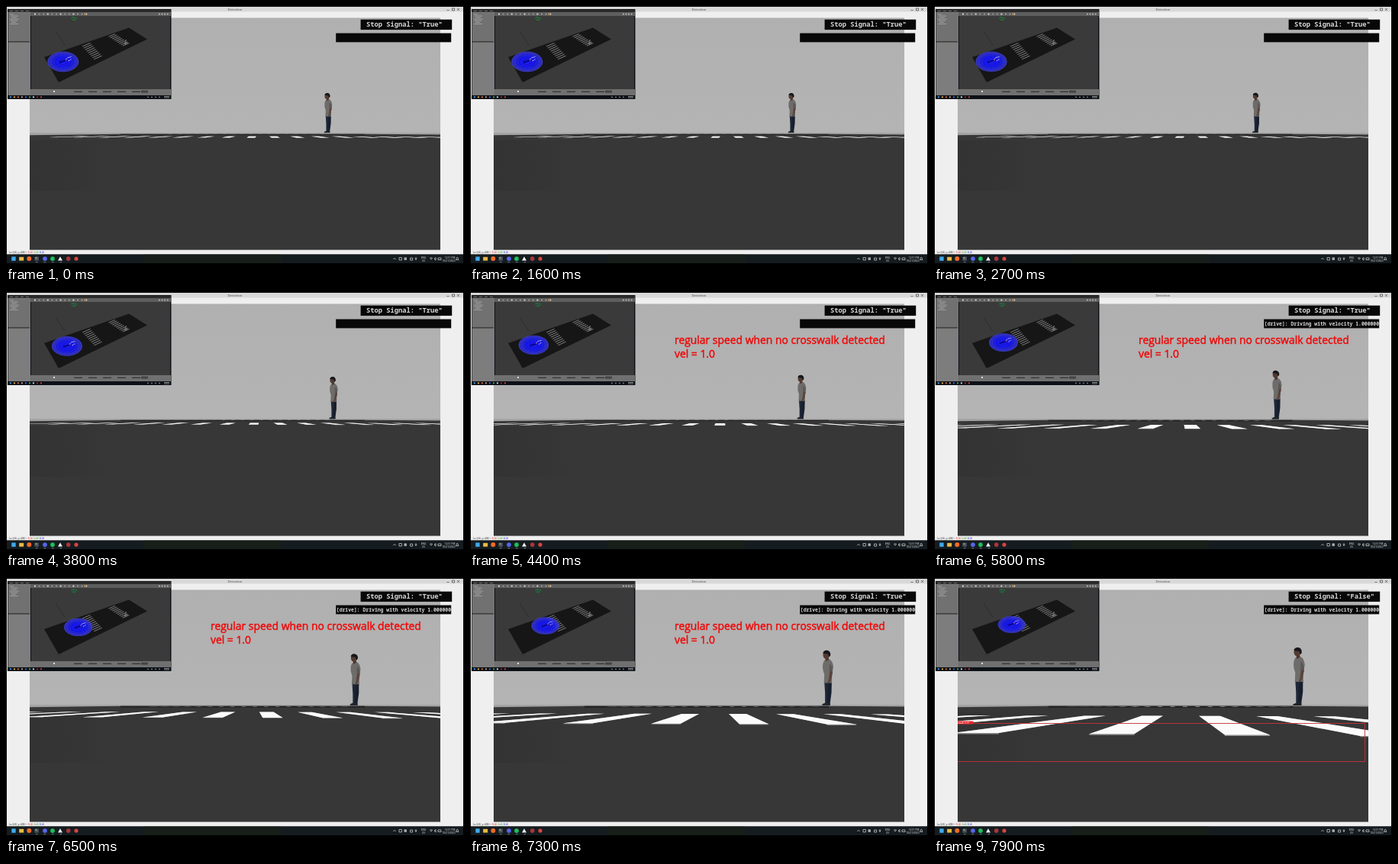
Animation of 600 by 338 pixels, one loop 8000 ms. Source, as an HTML page:

```html
<!DOCTYPE html>
<html lang="en">
<head>
<meta charset="utf-8">
<title>Crosswalk drive</title>
<style>
html, body { margin: 0; width: 100%; height: 100%; overflow: hidden; background: #000; }
svg { display: block; width: 100%; height: 100%; }
text { white-space: pre; }
.mono { font-family: "Noto Sans Mono", "DejaVu Sans Mono", monospace; fill: #d8d8d8; }
.tiny { font-family: "Open Sans", sans-serif; font-size: 3.2px; }
.title { font: 4.2px "Open Sans", sans-serif; fill: #444; }
.note { font: 13.9px "Open Sans", sans-serif; fill: #f00808; stroke: #f00808; stroke-width: .45; }
</style>
</head>
<body>
<svg viewBox="0 0 600 338">
  <defs>
    <clipPath id="camClip"><rect x="31" y="15.5" width="538" height="304"/></clipPath>
    <clipPath id="simClip"><rect x="33" y="13" width="182" height="96"/></clipPath>
    <linearGradient id="sky" x2="0" y2="1">
      <stop stop-color="#b0b0b0"/><stop offset="1" stop-color="#b4b4b4"/>
    </linearGradient>
    <linearGradient id="shade">
      <stop stop-color="#303030"/><stop offset="1" stop-color="#303030" stop-opacity="0"/>
    </linearGradient>
    <radialGradient id="scan">
      <stop stop-color="#0a0ae6"/><stop offset=".55" stop-color="#1212ec" stop-opacity=".95"/><stop offset="1" stop-color="#3a3ad8" stop-opacity=".78"/>
    </radialGradient>
  </defs>

  <!-- detection window -->
  <rect x="1" y="1" width="598" height="324.5" fill="#efefef"/>
  <rect x="1" y="1" width="598" height="6.5" fill="#d9d9d9"/>
  <text class="title" x="300" y="6" text-anchor="middle">Detection</text>
  <g fill="none" stroke="#444" stroke-width=".7">
    <path d="M577.5 5.5h3M584.5 3h3v3h-3zM591 3l3 3m0-3l-3 3"/>
  </g>
  <g clip-path="url(#camClip)">
    <rect x="31" y="15" width="538" height="155" fill="url(#sky)"/>
    <rect x="31" y="166.2" width="538" height="4" fill="#a2a2a2"/>
    <path d="M31 169.3L150 167.7H470L569 168.6V320H31z" fill="#373737"/>
    <rect x="31" y="176" width="115" height="66" fill="url(#shade)" opacity=".6"/>
    <path id="band" fill="#1f1f1f"/>
    <path id="farBars" fill="#a8a8a8"/>
    <path id="edges" fill="#8f8f8f"/>
    <path id="bars" fill="#fbfbfb"/>
    <g id="person">
      <path d="M-4-33L6-33 6-18 4-3 4 0-6 0-6-1.6-3-3-3-17z" fill="#1f2737"/>
      <path d="M1-30L6-32 5-16 3-3 0-3z" fill="#171e2c"/>
      <path d="M-7 0v-1.6l4-1.6h7V0z" fill="#20242b"/>
      <path d="M-3-63L3-64Q8-61 8.5-53L6.5-44 6.5-31-4.5-31-4-43Q-7-50-6-57 -5-62-3-63z" fill="#6e6c6a"/>
      <path d="M3-58Q8-54 7.5-46L5-34 2-31 1-33 3-45z" fill="#5a5756"/>
      <path d="M4-47l3.5 1-2.5 12-3 4-1.5-2 2-3z" fill="#5c4238"/>
      <path d="M-3-67h5v4l-4 2z" fill="#4c352d"/>
      <ellipse cx="-1.5" cy="-69.8" rx="4.3" ry="5.5" fill="#543b31"/>
      <path d="M-6-72Q-5-76.5 0-76 5-75 4.5-69L2.5-66.5 1-71z" fill="#17171b"/>
    </g>
    <g id="detection" fill="none">
      <rect id="box" x="10" width="554.5" height="50" stroke="#c0363a" stroke-width=".9"/>
      <rect id="tag" x="31" width="20.5" height="4" fill="#e6282c"/>
      <text id="tagText" class="tiny" x="31" fill="#fff">swalk 0.91</text>
    </g>
  </g>
  <text class="tiny" x="4" y="323.6" fill="#333">(x=228, y=408) ~ <tspan fill="#d33">R:46 </tspan><tspan fill="#292">G:46 </tspan><tspan fill="#33d">B:46</tspan></text>

  <!-- simulator window -->
  <rect x="2" y="4" width="214.5" height="118" fill="#0d1117"/>
  <rect x="2.5" y="4.6" width="213.5" height="3.4" fill="#2b2b2b"/>
  <rect x="2.5" y="8" width="29.5" height="109" fill="#7d7d7d"/>
  <rect x="3" y="9" width="28.5" height="37" fill="#717171"/>
  <rect x="3" y="46" width="28" height="1.6" fill="#3f3f3f"/>
  <rect x="32" y="8" width="184" height="5" fill="#5e5e5e"/>
  <rect x="32" y="109" width="184" height="8" fill="#707070"/>
  <g id="simChrome"></g>
  <g clip-path="url(#simClip)">
    <rect x="33" y="13" width="182" height="96" fill="#3a3a3a"/>
    <path d="M65 33L77 51" stroke="#29292d" stroke-width=".8"/>
    <path d="M50 67L161 28.5 185 43.5 69 100z" fill="#161616"/>
    <path id="stripes" stroke="#8c8c8c" stroke-width=".9" fill="none"/>
    <path d="M157.5 44l-2 6 4-2" stroke="#888" stroke-width=".9" fill="none"/>
    <path d="M85 16l3-1.5 5 1.5-3 3-4-1m2-3l2 4" stroke="#17863a" stroke-width=".8" fill="none"/>
    <g id="lidar">
      <ellipse rx="20.5" ry="13.2" fill="url(#scan)"/>
      <g id="rings" fill="none" stroke="#5a5aee" stroke-width=".35" opacity=".7"></g>
      <path d="M-5 1L4-2" stroke="#05058a" stroke-width="2"/>
      <path d="M3-2.5l3-2.8 5-1.2M7-1l4-2.5" stroke="#e7e7ff" stroke-width="1" stroke-dasharray="1.4 .8" fill="none"/>
      <circle cx="4" cy="-2" r=".8" fill="#9c405f"/>
    </g>
  </g>

  <!-- readouts -->
  <rect x="464.6" y="17.7" width="119.6" height="13.4" fill="#080808"/>
  <text id="signal" class="mono" x="472" y="27.2" font-size="8.75" font-weight="600"></text>
  <rect x="432.2" y="35.6" width="151" height="11.8" fill="#080808"/>
  <text id="log" class="mono" x="432.8" y="43.6" font-size="6.43" font-weight="600">[drive]: Driving with velocity 1.000000</text>
  <g id="note" class="note">
    <text x="268" y="68">regular speed when no crosswalk detected</text>
    <text x="268" y="86">vel = 1.0</text>
  </g>

  <!-- taskbar -->
  <rect x="1" y="325.5" width="598" height="11.5" fill="#151c20"/>
  <rect x="180" y="325.5" width="180" height="11.5" fill="#1b2117" opacity=".6"/>
  <g id="icons"></g>
  <g fill="none" stroke="#ddd" stroke-width=".7">
    <path d="M507.3 332l1.7-1.7 1.7 1.7M515 329.5h3.4v3.4h-3.4zM529.6 330h3v3h-3zM537 329v4m-1.2-2.5q1.2 3 2.4 0"/>
    <path d="M555 330.5q2-1.7 4 0M556 331.8q1-.8 2 0M561.5 330.5v1.5l1.5 1v-3.5zM566 330h4v2.5h-4zM589.5 332.5h3.4l-.6-1v-1.5q-1.1-1.5-2.2 0v1.5z"/>
  </g>
  <rect x="521.5" y="329.4" width="3.4" height="3.4" fill="#a9b0b5"/>
  <g class="tiny" fill="#eee" text-anchor="middle">
    <text x="547" y="330.6">ENG</text><text x="547" y="334.6">US</text>
    <text x="581.5" y="330.6">12:51 PM</text><text x="580" y="334.6">10/21/2023</text>
  </g>
</svg>
<script>
const LOOP = 8000, STEP = 100;
const HORIZON = 165, VANISH = 301;
const $ = id => document.getElementById(id);
const set = (id, attrs) => { for (const k in attrs) $(id).setAttribute(k, attrs[k]); };
const show = (id, on) => set(id, { visibility: on ? "visible" : "hidden" });
const rect = (x, y, w, h, fill) => `<rect x="${x}" y="${y}" width="${w}" height="${h}" fill="${fill}"/>`;
const dot = (x, y, r, fill) => `<circle cx="${x}" cy="${y}" r="${r}" fill="${fill}"/>`;
const range = (a, b) => Array.from({ length: b - a + 1 }, (_, i) => a + i);

function buildStatic() {
  $("stripes").setAttribute("d", range(0, 8).map(i =>
    `M${100 + i * 1.9} ${53 + i * 2.1}l10.5-4.6M${134.5 + i * 2.3} ${40.2 + i * 1.5}l8.5-3.7`).join(""));

  let rings = range(1, 5).map(i => `<ellipse rx="${i * 4}" ry="${i * 2.6}"/>`).join("");
  rings += range(0, 17).map(i => {
    const a = i * Math.PI / 9;
    return `<path d="M0 0L${20 * Math.cos(a)} ${13 * Math.sin(a)}" opacity=".45"/>`;
  }).join("");
  $("rings").innerHTML = rings;

  let chrome = range(0, 6).map(i =>
    rect(5 + (i % 3), 10.5 + i * 2.1, 5 + (i * 5) % 8, .8, "#a8a8a8")).join("");
  chrome += range(0, 12).map(i => rect(37 + i * 5.6, 9.7, 2, 1.8, i % 3 ? "#999" : "#ddd")).join("");
  chrome += range(0, 3).map(i => rect(200 + i * 3.6, 9.7, 1.8, 1.8, "#bbb")).join("");
  chrome += rect(102, 9.5, 3, 2, "#b98845");
  chrome += range(0, 4).map(i => rect(89 + i * 19, 111.7, 11, 1.2, "#303030")).join("");
  chrome += rect(62, 111, 2, 2, "#ddd") + rect(177, 110.6, 9, 3, "#444");
  chrome += range(0, 3).map(i => rect(5 + i * 7, 6, 4, .7, "#888")).join("");
  ["#42a5e8", "#dfb74a", "#e8712d", "#aaa", "#5865e0", "#28b957", "#ddd", "#8b3335", "#d54444"]
    .forEach((c, i) => chrome += dot(6 + i * 5, 119.3, 1.1, c));
  chrome += range(0, 3).map(i => rect(185 + i * 5, 118.8, 2, 1, "#999")).join("");
  chrome += rect(207, 118, 7, .7, "#bbb") + rect(207, 119.7, 7, .7, "#aaa");
  $("simChrome").innerHTML = chrome;

  $("icons").innerHTML = rect(7.3, 328.4, 5.4, 5.4, "#3fa9ee")
    + rect(17.2, 328.8, 6, 4.8, "#e8bb45")
    + dot(30.3, 331.1, 3, "#ee6b2c")
    + rect(37.5, 328.5, 5.4, 5.2, "#4d5357") + rect(38.4, 329.6, 2, .8, "#eee")
    + dot(51, 331.1, 2.9, "#5865e8")
    + dot(61, 331.1, 2.9, "#1fbf58")
    + `<path d="M71 328.3l3 5.3h-6z" fill="#eee"/>`
    + dot(81.7, 331.1, 2.8, "#a8363b")
    + dot(92, 331.1, 2.6, "#d7443e")
    + range(0, 3).map(i => rect(39 + i * 10.5, 335.4, 2.6, .7, "#8ea2ad")).join("");
}

// Ground travelled, in seconds at full speed, with a soft start.
function travel(t) {
  const s = Math.max(0, t - 2.4);
  return s < 1.06 ? s * s / 2.12 : s - .53;
}

// Slabs of one crosswalk at depth z; the row runs slightly askew to the camera.
function crosswalk(z, length, drop = 0) {
  const near = 1 / z, far = 1 / (z + length);
  return range(-8, 9).map(n => {
    const skew = .0008 * n;
    const yn = HORIZON + 1 / (z - skew), yf = HORIZON + 1 / (z + length - skew);
    const xn = VANISH + near * (2.7 + 4.38 * n), wn = near * .73;
    const xf = VANISH + far * (3.8 + 4.75 * n), wf = far * .88;
    return `M${xf - wf} ${yf}H${xf + wf}L${xn + wn} ${yn}v${drop}H${xn - wn}v${-drop}z`;
  }).join("");
}

function draw(ms) {
  const u = travel(ms / 1000);
  const z = .1355 - .0223 * u, near = HORIZON + 1 / z;

  set("bars", { d: crosswalk(z, .0386) });
  set("edges", { d: crosswalk(z, .0386, Math.min(1.4, .04 / z)) });
  set("farBars", { d: crosswalk(z + .23, .05) });
  set("band", { d: `M150 167.7H470V${168.8 + .2 * u}H150z` });

  const s = 1 / (1 - .0635 * u);
  set("person", { transform: `translate(${300.5 + 121 * s} ${166 + (s - 1) * 2.2}) scale(${s * 52 / 76})` });

  const top = near - 15;
  set("box", { y: top });
  set("tag", { y: top - 3 });
  set("tagText", { y: top + .2 });

  set("lidar", { transform: `translate(${74.8 + 6 * u - .12 * u * u} ${73 - 2.4 * u}) scale(${1 - .025 * u} ${1 - .033 * u})` });

  const seen = ms >= 7400;
  $("signal").textContent = `Stop Signal: "${seen ? "False" : "True"}"`;
  show("detection", seen);
  show("note", ms >= 4400 && !seen);
  show("log", ms >= 5800);
}

buildStatic();
const start = performance.now();
function tick() {
  const ms = (performance.now() - start) % LOOP;
  draw(Math.floor(ms / STEP) * STEP);
  requestAnimationFrame(tick);
}
tick();
</script>
</body>
</html>
```
